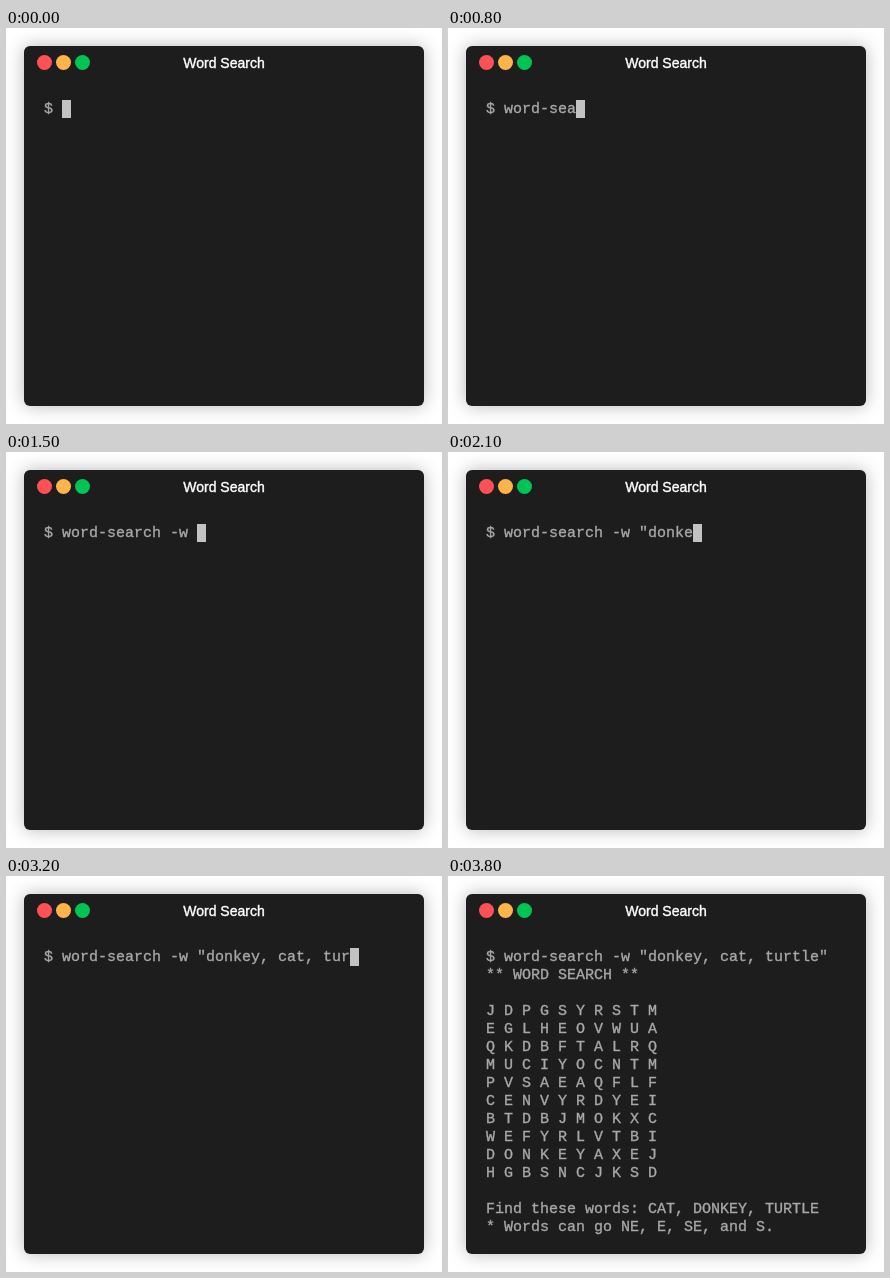
Write an HTML page that moves like this. It is 436 px wide and 396 px high and loops after 5.8 s.

```html
<!DOCTYPE html>
<html lang="en">
<head>
<meta charset="utf-8">
<title>Word Search</title>
<style>
  html, body { margin: 0; width: 100%; height: 100%; overflow: hidden; background: #fff; }
  .window {
    position: absolute; left: 18px; top: 18px; width: 400px; height: 360px;
    border-radius: 6px; background: #1d1d1d;
    box-shadow: 0 0 18px rgba(0, 0, 0, .28);
  }
  .button { position: absolute; top: 9px; width: 15px; height: 15px; border-radius: 50%; }
  .title {
    position: absolute; left: 0; top: 9px; width: 100%;
    font: 14px/16px Arial, "Liberation Sans", sans-serif;
    text-align: center; color: #fff;
    -webkit-text-stroke: .4px #fff;
  }
  pre {
    position: absolute; left: 20px; top: 55px; margin: 0;
    font: 15px/18px "Courier New", Courier, "Liberation Mono", monospace;
    color: #a8a8a8; font-variant-ligatures: none;
    -webkit-text-stroke: .35px #a8a8a8;
  }
  #cursor { position: absolute; top: 54px; width: 9px; height: 18px; background: #c2c2c2; }
</style>
</head>
<body>
<div class="window">
  <div class="button" style="left:13px;background:#ff5055"></div>
  <div class="button" style="left:32px;background:#ffb34b"></div>
  <div class="button" style="left:51px;background:#00c453"></div>
  <div class="title">Word Search</div>
  <pre id="screen">$ </pre>
  <div id="cursor" style="left:38px"></div>
</div>
<script>
  const LOOP = 5800, KEY_TIME = 100, OUTPUT_AT = 3800, CELL = 9;
  const command = 'word-search -w "donkey, cat, turtle"';
  const rows = [
    'JDPGSYRSTM', 'EGLHEOVWUA', 'QKDBFTALRQ', 'MUCIYOCNTM', 'PVSAEAQFLF',
    'CENVYRDYEI', 'BTDBJMOKXC', 'WEFYRLVTBI', 'DONKEYAXEJ', 'HGBSNCJKSD'
  ];
  const output = [
    '** WORD SEARCH **', '',
    ...rows.map(row => [...row].join(' ')), '',
    'Find these words: CAT, DONKEY, TURTLE',
    '* Words can go NE, E, SE, and S.'
  ].join('\n');

  const screen = document.getElementById('screen');
  const cursor = document.getElementById('cursor');

  function draw(now) {
    const t = Math.max(0, now) % LOOP;
    const done = t >= OUTPUT_AT;
    const typed = Math.min(command.length, Math.floor(t / KEY_TIME));
    const text = '$ ' + command.slice(0, typed) + (done ? '\n' + output : '');
    if (screen.textContent !== text) screen.textContent = text;
    cursor.style.left = 20 + (2 + typed) * CELL + 'px';
    cursor.style.visibility = done ? 'hidden' : 'visible';
    requestAnimationFrame(draw);
  }
  draw(performance.now());
</script>
</body>
</html>
```
